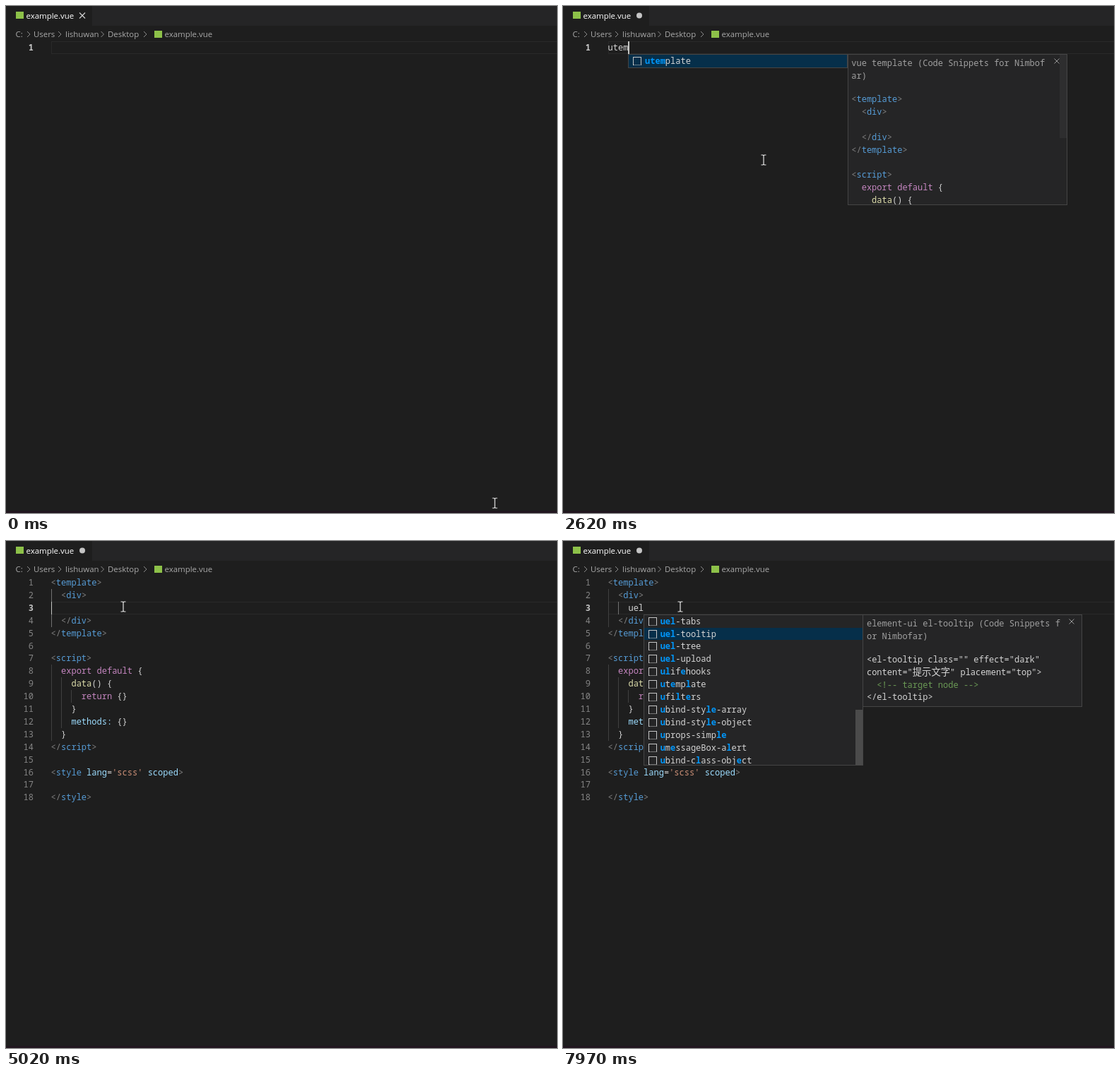
These frames come from a looping animation (780x718 px, 8000 ms). An HTML page:

```html
<!DOCTYPE html>
<html lang="en">
<head>
<meta charset="utf-8">
<title>Snippet completion</title>
<style>
html, body { margin: 0; width: 100%; height: 100%; overflow: hidden; background: #1e1e1e; }
#stage { position: relative; width: 780px; height: 718px; overflow: hidden; color: #d4d4d4;
  font: 500 12.03px/17.9px "Noto Sans Mono", "Noto Sans CJK SC", monospace; white-space: pre;
  font-variant-ligatures: none; }
#stage div, #stage svg { position: absolute; box-sizing: border-box; }
#chrome, #view { inset: 0; }
#chrome div { font: 11.45px/18px "Open Sans", sans-serif; color: #a9a9a9; }
#chrome .tab { color: #fff; font-weight: 500; }
svg { left: 0; top: 0; overflow: visible; }
.p { color: #808080 } .t { color: #569cd6 } .k { color: #c586c0 } .f { color: #dcdcaa }
.a { color: #9cdcfe } .s { color: #ce9178 } .c { color: #6a9955 } .cjk { font-size: 13.3px }
.num { left: 0; width: 39px; text-align: right; color: #858585; }
.num.on { color: #c6c6c6; font-weight: bold; }
.line { left: 63.6px; width: 720px; height: 18px; border: 1px solid #2a2a2a; }
.guide { width: 1px; background: #404040; }
.guide.on { background: #707070; }
.caret { width: 1.5px; height: 17.9px; background: #c4c5c3; }
.list, .pane { background: #252526; border: 1px solid #454545; overflow: hidden; }
.row { left: 0; width: 310px; height: 17.9px; padding-left: 22.5px; }
.row i { position: absolute; left: 6px; top: 3px; width: 12px; height: 12px; box-sizing: border-box;
  border: 1px solid #c5c5c5; border-bottom-style: dotted; }
.row b { color: #0097fb; }
.row.over { background: #2a2d2e; }
.row.sel { background: #062f4a; }
.thumb { right: 0; width: 10px; background: #4b4b4b; }
.title { left: 4.5px; top: 3.5px; color: #a0a0a0; }
.body { left: 4.5px; top: 54px; }
</style>
</head>
<body>
<div id="stage">
  <div id="chrome">
    <svg width="780" height="718">
      <path d="M122 0H780V28H122Z" fill="#252526"/>
      <path d="M0 715H780V718H0Z" fill="#21161f"/>
      <path d="M14 8H25V18H14ZM210 35H221V45H210Z" fill="#8dc149"/>
      <path d="M30 36l4 4-4 4M74 36l4 4-4 4M134.5 36l4 4-4 4M195 36l4 4-4 4" fill="none" stroke="#8c8c8c"/>
      <path id="close" d="M104 9.5l8 8M112 9.5l-8 8" stroke="#d0d0d0" stroke-width="1.2"/>
      <circle id="dirty" cx="108" cy="13.5" r="4" fill="#c5c5c5"/>
    </svg>
    <div class="tab" style="left:28.5px;top:4.5px">example.vue</div>
    <div style="left:13.5px;top:31px">C:</div>
    <div style="left:39px;top:31px">Users</div>
    <div style="left:84px;top:31px">lishuwan</div>
    <div style="left:144px;top:31px">Desktop</div>
    <div style="left:224.5px;top:31px">example.vue</div>
  </div>
  <div id="view"></div>
</div>
<script>
const LOOP = 8000, LH = 17.9, CW = 7.218, X0 = 63.6, Y0 = 50;
const $ = id => document.getElementById(id);

const template = `<template>
  <div>

  </div>
</template>

<script>
  export default {
    data() {
      return {}
    }
    methods: {}
  }
<\/script>

<style lang='scss' scoped>

</style>`;

const menus = {
  vue: {
    items: ('utemplate uel-table uel-tabs uel-tooltip uel-tree udata umethods unotification ' +
      'uwatch uwatch-deep ufilters urouter-beforeEach').split(' '),
    thumb: [0, 88]
  },
  element: {
    items: ('uel-tabs uel-tooltip uel-tree uel-upload ulifehooks utemplate ufilters ubind-style-array ' +
      'ubind-style-object uprops-simple umessageBox-alert ubind-class-object').split(' '),
    thumb: [134, 79]
  }
};
const details = {
  'utemplate': ['vue template (Code Snippets for Nimbof\nar)', template],
  'uel-tree': ['element-ui el-tree (Code Snippets for\nNimbofar)',
    '<el-tree :data="" :props="" @node-\nclick="handleNodeClick"><el-tree>'],
  'uel-tooltip': ['element-ui el-tooltip (Code Snippets f\nor Nimbofar)',
    '<el-tooltip class="" effect="dark"\ncontent="提示文字" placement="top">\n  <!-- target node -->\n</el-tooltip>']
};

// Each entry changes part of the editor state from its time on.
const events = [
  [0, { full: false, typed: '', line: 0, indent: 0, caret: false, menu: null, sel: '' }],
  [527, { caret: true }], [1060, { caret: false }], [1610, { caret: true }],
  [1840, { typed: 'u', menu: 'vue', sel: 'utemplate' }],
  [2300, { caret: false }],
  [2450, { typed: 'ut', caret: true }],
  [2530, { typed: 'ute' }],
  [2620, { typed: 'utem' }],
  [3080, { full: true, typed: '', line: 17, indent: 8, menu: null }],
  [3540, { caret: false }], [4090, { caret: true }], [4640, { caret: false }],
  [5020, { line: 2, indent: 0, caret: true }],
  [5420, { indent: 4 }],
  [5880, { caret: false }],
  [6180, { typed: 'u', caret: true, menu: 'element', sel: 'uel-tree' }],
  [6260, { typed: 'ue' }],
  [6500, { typed: 'uel' }],
  [6960, { caret: false }], [7510, { caret: true }],
  [7900, { sel: 'uel-tooltip' }],
  [7970, { caret: false }]
];
const stateAt = t => Object.assign({}, ...events.filter(e => e[0] <= t).map(e => e[1]));

// The pointer travels in nine visible jumps.
function glide(t, start, end) {
  const p = Math.max(0, Math.min(9, Math.floor((t - start) / (end - start) * 8 + 1e-6) + 1)) / 9;
  return p * p * (3 - 2 * p);
}
function pointerAt(t) {
  const a = glide(t, 70, 680), b = glide(t, 4410, 5020);
  return [692 - 408 * a - 118 * b, 704 - 486 * a - 125 * b];
}

const esc = s => s.replace(/&/g, '&amp;').replace(/</g, '&lt;');
const box = (cls, style, html = '') => `<div class="${cls}" style="${style}">${html}</div>`;
const at = (x, y, w, h) => `left:${x}px;top:${y}px;width:${w}px;height:${h}px`;

const syntax = /(<\/?|>)|\b(template|div|script|style)\b|\b(export|default|return)\b|\b(data)\b|(methods:|\blang\b|\bscoped\b)|('\w+')/g;
const paint = code => code.replace(syntax, (m, ...g) =>
  `<span class="${'ptkfas'[g.slice(0, 6).findIndex(Boolean)]}">${esc(m)}</span>`);
const plain = s => esc(s).replace(/&lt;!--.*-->/, '<span class="c">$&</span>')
  .replace(/[一-龥]+/, '<span class="cjk">$&</span>');

// Positions of the query letters in a word, allowing the last two to be swapped.
function match(word, query) {
  const find = q => {
    const hits = [];
    let from = 0;
    for (const c of q) {
      const i = word.indexOf(c, from);
      if (i < 0) return null;
      hits.push(i);
      from = i + 1;
    }
    return hits;
  };
  return find(query) || find(query.replace(/(.)(.)$/, '$2$1'));
}

function menuHtml(s, x, y, pointer) {
  const { items, thumb } = menus[s.menu];
  const rows = items.filter(w => match(w, s.typed));
  const height = Math.min(214.3, rows.length * LH + 2);
  const over = pointer[0] > x && pointer[0] < x + 310 ? Math.floor((pointer[1] - y) / LH) : -1;
  let html = rows.map((word, i) => {
    const hits = match(word, s.typed);
    const label = [...word].map((c, k) => hits.includes(k) ? `<b>${c}</b>` : c).join('');
    const cls = word === s.sel ? 'row sel' : i === over ? 'row over' : 'row';
    return box(cls, `top:${i * LH}px`, '<i></i>' + label);
  }).join('');
  if (rows.length > 11) html += box('thumb', `top:${thumb[0]}px;height:${thumb[1]}px`);

  const [title, body] = details[s.sel];
  const tall = s.sel === 'utemplate';
  const paneHeight = Math.min(214.3, 59.4 + LH * body.split('\n').length);
  const pane = (tall ? box('thumb', 'top:0;height:118px;background:#2e2e2f') : '') +
    box('title', '', title) + box('body', '', tall ? paint(body) : plain(body)) +
    '<svg width="310" height="20"><path d="M291.5 5.5l7 7M298.5 5.5l-7 7" stroke="#999"/></svg>';
  return {
    html: box('list', at(x, y, 311, height), html) + box('pane', at(x + 310.3, y, 311, paneHeight), pane),
    hand: over >= 0 && over < rows.length
  };
}

function pointerHtml([x, y], hand) {
  const shape = hand
    ? '<path d="M-2 1Q0-2 2 1V7L7 8.5Q8 9 8 11V14Q8 16 6.5 18V20H-2V18L-6.5 11Q-6 9-4 10L-2 12Z" fill="#fff" stroke="#1e1e1e" stroke-width=".6"/>'
    : '<path d="M-3.5-7H-1L0-6L1-7H3.5M0-6V6M-3.5 7H-1L0 6L1 7H3.5" fill="none" stroke="#e6e6e6" stroke-width="1.2"/>';
  return `<svg width="1" height="1"><g transform="translate(${x} ${y})">${shape}</g></svg>`;
}

function guides(s) {
  const list = s.full ? [[0, 1, 3], [0, 7, 6], [2, 8, 4], [4, 9, 1]] : [];
  if (s.line === 2 && s.indent) list.push([2, 2, 1]);
  return list.map(([col, from, n]) => {
    const active = s.line === 2 && from < 4 && col === (s.indent ? 2 : 0);
    return box(active ? 'guide on' : 'guide', `left:${X0 + col * CW}px;top:${Y0 + from * LH}px;height:${n * LH}px`);
  }).join('');
}

function render(t) {
  const s = stateAt(t), pointer = pointerAt(t);
  const lines = s.full ? template.split('\n') : [''];
  if (s.line < 17) lines[s.line] = ' '.repeat(s.indent) + s.typed;
  const x = X0 + (s.indent + s.typed.length) * CW, y = Y0 + s.line * LH;
  const menu = s.menu ? menuHtml(s, x, y + LH, pointer) : { html: '', hand: false };
  return box('line', `top:${y}px`) + guides(s) +
    lines.map((_, i) => box(i === s.line ? 'num on' : 'num', `top:${Y0 + i * LH}px`, i + 1)).join('') +
    box('', `left:${X0}px;top:${Y0}px`, paint(lines.join('\n'))) +
    (s.caret ? box('caret', `left:${x}px;top:${y}px`) : '') +
    menu.html + pointerHtml(pointer, menu.hand);
}

let shown = '';
function tick() {
  const t = performance.now() % LOOP, html = render(t);
  if (html !== shown) {
    $('view').innerHTML = shown = html;
    $('close').style.display = t < 1840 ? '' : 'none';
    $('dirty').style.display = t < 1840 ? 'none' : '';
  }
  requestAnimationFrame(tick);
}
tick();
</script>
</body>
</html>
```
